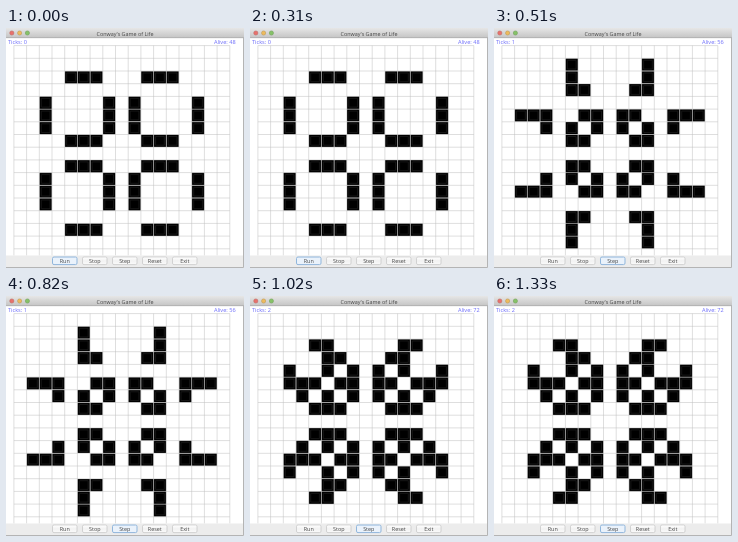
These frames come from a looping animation (238 px wide and 240 px high, 1530 ms). An HTML page:

```html
<!DOCTYPE html>
<html>
<head>
<meta charset="utf-8">
<style>
html, body { margin: 0; width: 100%; height: 100%; overflow: hidden; background: #fff; }
svg { display: block; width: 238px; height: 240px; }
text { font-family: "Open Sans", "Noto Sans", sans-serif; font-size: 5.4px; fill: #444; }
.status { fill: #6a6afa; font-size: 5.6px; }
</style>
</head>
<body>
<svg viewBox="0 0 238 240">
  <defs>
    <linearGradient id="bar" x2="0" y2="1">
      <stop stop-color="#e6e6e6"/><stop offset="1" stop-color="#c4c4c4"/>
    </linearGradient>
    <linearGradient id="btn" x2="0" y2="1">
      <stop stop-color="#fff"/><stop offset=".5" stop-color="#f2f2f2"/><stop offset="1" stop-color="#fafafa"/>
    </linearGradient>
  </defs>
  <rect width="238" height="240" fill="#fff"/>
  <path id="cells"/>
  <path id="insets" fill="none" stroke="#242424" stroke-width=".6"/>
  <path id="grid" fill="none" stroke="#bcbcbc" stroke-width=".5"/>
  <rect width="238" height="10" fill="url(#bar)"/>
  <path d="M0 9.7H238" stroke="#a2a2a2" stroke-width=".6"/>
  <g stroke-width=".5">
    <circle cx="5.8" cy="5" r="2.1" fill="#e8716c" stroke="#b9605a"/>
    <circle cx="13.6" cy="5" r="2.1" fill="#eebb5c" stroke="#b8934c"/>
    <circle cx="21.4" cy="5" r="2.1" fill="#86c268" stroke="#66994f"/>
  </g>
  <text x="119" y="7.7" text-anchor="middle">Conway's Game of Life</text>
  <text id="ticks" class="status" x="2" y="16"></text>
  <text id="alive" class="status" x="208" y="16"></text>
  <rect y="227.5" width="238" height="12.5" fill="#ececec"/>
  <g id="buttons"></g>
  <path d="M237.5 10V239.5H0" fill="none" stroke="#b4b4b4"/>
</svg>
<script>
const $ = id => document.getElementById(id);
const SIZE = 17, CELL = 12.7, LEFT = 7.9, TOP = 17.6, STEP_MS = 510;
const px = i => +(LEFT + i * CELL).toFixed(2);
const py = i => +(TOP + i * CELL).toFixed(2);

function seed() {
  const bars = [2, 3, 4, 8, 9, 10], edges = [0, 5, 7, 12];
  const live = new Set();
  for (const a of bars) for (const b of edges) {
    live.add((b + 2) * SIZE + a + 2);
    live.add((a + 2) * SIZE + b + 2);
  }
  return live;
}

function evolve(live) {
  const next = new Set();
  for (let r = 0; r < SIZE; r++) for (let c = 0; c < SIZE; c++) {
    let n = 0;
    for (let dr = -1; dr <= 1; dr++) for (let dc = -1; dc <= 1; dc++) {
      const x = c + dc, y = r + dr;
      if ((dr || dc) && x >= 0 && x < SIZE && live.has(y * SIZE + x)) n++;
    }
    const id = r * SIZE + c;
    if (n === 3 || (n === 2 && live.has(id))) next.add(id);
  }
  return next;
}

// Squares for all live cells, shrunk by a margin on every side
function squares(live, margin) {
  const side = CELL - 2 * margin;
  return [...live].map(id => {
    const x = px(id % SIZE) + margin, y = py(Math.floor(id / SIZE)) + margin;
    return `M${x} ${y}h${side}v${side}h${-side}z`;
  }).join("");
}

let lines = "";
for (let i = 0; i <= SIZE; i++) {
  lines += `M${px(i)} ${TOP}V227.5`;
  if (py(i) < 227) lines += `M${LEFT} ${py(i)}H${px(SIZE)}`;
}
$("grid").setAttribute("d", lines);

$("buttons").innerHTML = ["Run", "Stop", "Step", "Reset", "Exit"].map((name, i) => {
  const x = 46.5 + i * 30;
  return `<rect x="${x}" y="229" width="24.5" height="7.6" rx="1.5"/>
    <text x="${x + 12.25}" y="234.8" text-anchor="middle">${name}</text>`;
}).join("");
const frames = $("buttons").querySelectorAll("rect");

const states = [seed()];
while (states.length < 3) states.push(evolve(states[states.length - 1]));

let shown = -1;
function show(tick) {
  if (tick === shown) return;
  shown = tick;
  const live = states[tick];
  $("cells").setAttribute("d", squares(live, 0.2));
  $("insets").setAttribute("d", squares(live, 2));
  $("ticks").textContent = "Ticks: " + tick;
  $("alive").textContent = "Alive: " + live.size;
  const focus = tick ? 2 : 0;
  frames.forEach((f, i) => {
    const on = i === focus;
    f.setAttribute("fill", on ? "#eaf2fb" : "url(#btn)");
    f.setAttribute("stroke", on ? "#90b6dc" : "#bcbcbc");
    f.setAttribute("stroke-width", on ? 1 : .6);
  });
}

const start = performance.now();
function loop() {
  show(Math.floor((performance.now() - start) / STEP_MS) % states.length);
  requestAnimationFrame(loop);
}
show(0);
loop();
</script>
</body>
</html>
```
